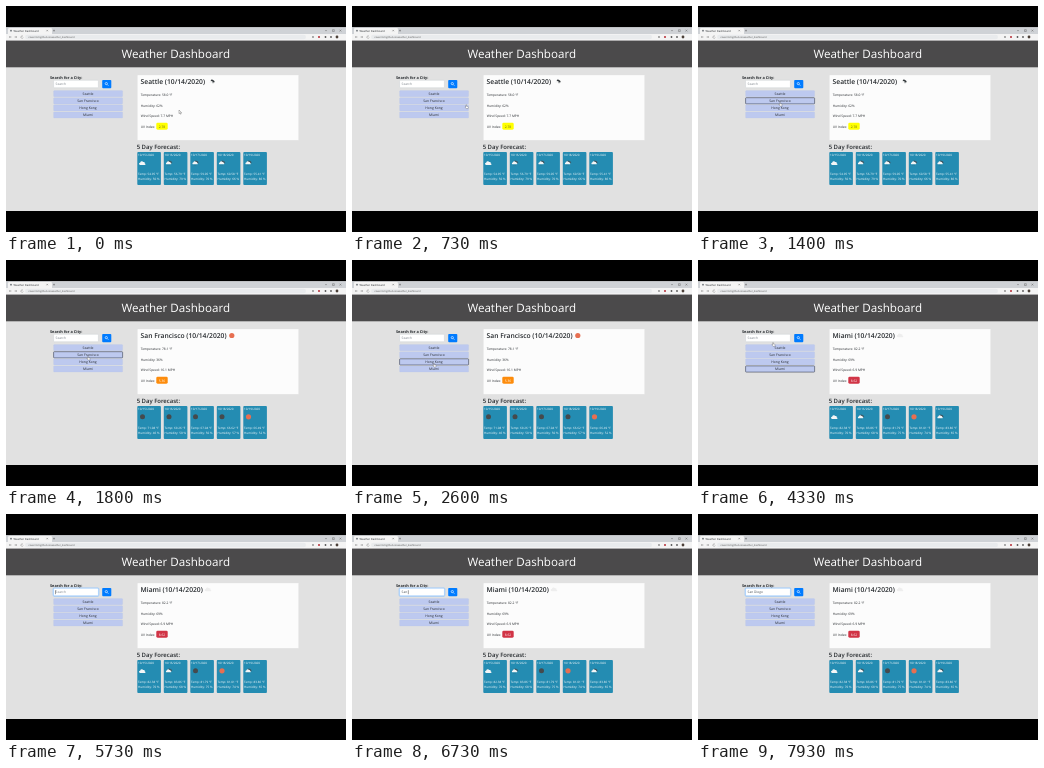
These frames come from a looping animation (340 by 226 pixels, 8000 ms). An HTML page:

```html
<!DOCTYPE html>
<html lang="en">
<head>
<meta charset="utf-8">
<title>Weather Dashboard</title>
<style>
  html, body { margin: 0; width: 100%; height: 100%; overflow: hidden; background: #000; }
  svg { display: block; width: 100%; height: 100%; }
  text { font-family: "Open Sans", "Noto Sans", sans-serif; text-rendering: geometricPrecision; fill: #24282c; white-space: pre; }
  .mid { text-anchor: middle; }
  .semi { font-weight: 600; }
  .bold { font-weight: 700; }
  .card text { fill: #fff; font-weight: 500; }
</style>
</head>
<body>
<svg viewBox="0 0 340 226">
  <defs>
    <path id="puff" d="M-2.9 2.2a1.5 1.5 0 0 1 0-3 2.3 2.3 0 0 1 4.2-.9 1.7 1.7 0 0 1 2 1.9 1 1 0 0 1 0 2z"/>
    <g id="cloud"><use href="#puff" fill="#f4f6f7" transform="translate(-.2 .5) scale(.75)"/></g>
    <g id="broken">
      <use href="#puff" fill="#3f5a66" transform="translate(.8 -.4) scale(.6)"/>
      <use href="#puff" fill="#f4f6f7" transform="translate(-.4 .6) scale(.65)"/>
    </g>
    <g id="rain">
      <use href="#broken" transform="translate(0 -.4) scale(.95)"/>
      <path d="M-.9 2l-.4 .9M.5 2l-.4 .9" stroke="#3f5a66" stroke-width=".4"/>
    </g>
    <circle id="night" r="2.5" fill="#454a4d"/>
    <circle id="sun" r="2.6" fill="#e76f51"/>
    <g id="overcast">
      <use href="#puff" fill="#33383b" transform="translate(.4 -.4) scale(.55)"/>
      <use href="#puff" fill="#f6f6f6" transform="translate(-.8 .5) scale(.45)"/>
      <path d="M.2 1.2h1.6" stroke="#33383b" stroke-width=".5"/>
    </g>
    <use id="faint" href="#puff" fill="#eeeeee" transform="scale(.75)"/>
  </defs>

  <rect width="340" height="226"/>
  <rect y="21.3" width="340" height="183.7" fill="#e1e1e1"/>

  <!-- browser bar -->
  <rect y="21.3" width="340" height="6.7" fill="#cfd2d6"/>
  <rect x="2" y="22" width="44" height="7" rx="1.2" fill="#f4f4f4"/>
  <circle cx="5" cy="24.7" r=".9" fill="#6d7379"/>
  <text x="7.5" y="25.7" font-size="2.7">Weather Dashboard</text>
  <g fill="none" stroke="#555" stroke-width=".4">
    <path d="M40.5 23.9l1.4 1.4m0-1.4l-1.4 1.4M47 24.6h2m-1-1v2M319 24.6h2M326.5 23.7h1.8v1.8h-1.8zM333.5 23.7l1.8 1.8m0-1.8l-1.8 1.8"/>
  </g>
  <rect y="28" width="340" height="6.6" fill="#f4f4f4"/>
  <path d="M5.5 31h-2.2l1-1m-1 1l1 1M8.5 31h2.2l-1-1m1 1l-1 1M17 30.3a1.2 1.2 0 1 0 .2 1.2" fill="none" stroke="#666" stroke-width=".4"/>
  <rect x="19" y="28.8" width="281" height="4.4" rx="2.2" fill="#e9ebed"/>
  <text x="22.5" y="32" font-size="2.5" style="fill:#555">ravenmill.github.io/weather_dashboard</text>
  <circle cx="307" cy="31" r=".9" fill="#888"/>
  <circle cx="313" cy="31" r="1" fill="#b52b35"/>
  <circle cx="319.5" cy="31" r=".9" fill="#555"/>
  <circle cx="325" cy="31" r=".9" fill="#555"/>
  <circle cx="331" cy="31" r="1.4" fill="#4c4038"/>

  <rect y="34.6" width="340" height="26.7" fill="#4b4a4b"/>
  <text class="mid" x="169.7" y="52" font-size="11.6" style="fill:#fff">Weather Dashboard</text>

  <!-- search column -->
  <text class="bold" x="44" y="72.9" font-size="3.85">Search for a City:</text>
  <rect id="glow" x="46.6" y="73.4" width="46.8" height="9.3" rx="1.6" fill="#a9cdf5"/>
  <rect id="field" x="47.6" y="74.3" width="44.8" height="7.5" rx=".9" fill="#fff" stroke-width=".4"/>
  <text id="query" x="49.6" y="79.3" font-size="3.3"></text>
  <path id="caret" d="M49.5 76.2v4" stroke="#111" stroke-width=".4"/>
  <rect x="96.2" y="73.9" width="9.1" height="8.3" rx=".9" fill="#007bff"/>
  <g fill="none" stroke="#fff" stroke-width=".6">
    <circle cx="100.3" cy="77.6" r="1.1"/><path d="M101.1 78.4l1.3 1.3"/>
  </g>
  <g id="cities"></g>

  <!-- current weather -->
  <rect x="131.3" y="69" width="161.4" height="65.2" fill="#fcfcfc" stroke="#dcdcdc" stroke-width=".3"/>
  <g id="today"></g>
  <text class="semi" x="130.7" y="143.2" font-size="5.95">5 Day Forecast:</text>
  <g id="forecast"></g>

  <g id="pointer" stroke="#444" stroke-width=".4" fill="#fff">
    <path id="arrow" d="M0 0v4.3l1-.9.8 1.6.7-.3-.7-1.6h1.3z" transform="scale(.85)"/>
    <path id="hand" d="M-.4 .3q.5-.6.9 0v1.8l2 .5q.5.2.4.8l-.5 1.8h-2.4l-1.5-2q0-.6.6-.4l.5.4z" transform="translate(0 -.8) scale(.75)"/>
  </g>
</svg>

<script>
const LOOP = 8000;
const $ = id => document.getElementById(id);
const show = (id, on) => $(id).setAttribute("visibility", on ? "visible" : "hidden");

const reports = [
  { from: 0, city: "Seattle", icon: "overcast", iconX: 206, temp: "58.0", humidity: 62, wind: "7.7",
    uv: "2.78", badge: "#ffff00", ink: "#5c5c20",
    days: ["cloud 54.95 50", "rain 56.79 79", "rain 59.05 70", "rain 60.58 66", "rain 55.41 86"] },
  { from: 1600, city: "San Francisco", icon: "sun", iconX: 225.8, temp: "78.1", humidity: 36, wind: "16.1",
    uv: "5.36", badge: "#fd8c0c", ink: "#fff",
    days: ["night 71.08 46", "night 69.26 50", "night 67.04 50", "night 66.62 57", "sun 66.49 52"] },
  { from: 2800, city: "Hong Kong", icon: "overcast", iconX: 220.7, temp: "75.2", humidity: 73, wind: "4.0",
    uv: "9.23", badge: "#d13446", ink: "#fff",
    days: ["broken 76.89 70", "broken 78.44 68", "broken 79.63 66", "broken 76.21 77", "broken 78.26 72"] },
  { from: 3800, city: "Miami", icon: "faint", iconX: 202, temp: "82.2", humidity: 69, wind: "6.9",
    uv: "8.62", badge: "#d13446", ink: "#fff",
    days: ["cloud 82.38 70", "rain 83.86 68", "night 81.79 75", "sun 81.01 74", "rain 83.86 65"] }
];

const focusTimes = [[0, -1], [1260, 1], [2400, 2], [3660, 3], [4660, -1]];
const inputFocus = 4660;
const blink = 533;
const keyTimes = [6260, 6530, 6600, 6730, 6930, 7130, 7200, 7260, 7400];
const typed = "San Diego";
const path = [
  [0, 173, 104], [330, 173, 104], [1000, 82, 97], [2060, 82, 97], [2400, 82, 104],
  [3330, 82, 104], [3600, 82, 107], [3950, 82, 107], [4330, 75, 83.2], [4530, 74.5, 79], [LOOP, 74.5, 79]
];

const latest = (list, t, time) => list.filter(item => time(item) <= t).pop();
const label = (x, y, size, str, attrs = "") => `<text x="${x}" y="${y}" font-size="${size}" ${attrs}>${str}</text>`;
const icon = (name, x, y) => `<use href="#${name}" transform="translate(${x} ${y})"/>`;

function todayMarkup(r) {
  return label(134.6, 77.5, 6.72, `${r.city} (10/14/2020)`, 'class="semi"') + icon(r.icon, r.iconX, 75.5) +
    label(134.7, 90, 3.25, `Temperature: ${r.temp} °F`) +
    label(134.7, 100.6, 3.25, `Humidity: ${r.humidity}%`) +
    label(134.7, 111, 3.25, `Wind Speed: ${r.wind} MPH`) +
    label(134.7, 121.6, 3.25, "UV Index:") +
    `<rect x="150.3" y="116.7" width="11.4" height="7" rx="1.4" fill="${r.badge}"/>` +
    label(156, 121.5, 3.25, r.uv, `class="mid" style="fill:${r.ink}"`);
}

function cardMarkup(day, i) {
  const [sky, temp, humidity] = day.split(" ");
  return `<g class="card" transform="translate(${131.3 + 26.5 * i} 146)">
    <rect width="23.6" height="33" rx=".9" fill="#248cb2"/>
    ${label(.8, 4.1, 3, `10/${15 + i}/2020`)}${icon(sky, 5.2, 10.8)}
    ${label(.8, 22.7, 3, `Temp: ${temp} °F`)}${label(.8, 28.1, 3.05, `Humidity: ${humidity} %`)}</g>`;
}

$("cities").innerHTML = reports.map(({ city }, i) => {
  const y = 84.6 + 7.1 * i;
  return `<rect class="city" x="47.6" y="${y}" width="69" height="6.2" rx=".7" fill="#bdc9ef"/>` +
    label(82, y + 4.3, 3.4, city, 'class="mid"');
}).join("");
const cityBoxes = document.querySelectorAll(".city");

function pointerAt(t) {
  const i = path.findIndex(p => p[0] > t);
  const [t0, x0, y0] = path[i - 1], [t1, x1, y1] = path[i];
  const k = (t - t0) / (t1 - t0), e = k * k * (3 - 2 * k);
  return [x0 + (x1 - x0) * e, y0 + (y1 - y0) * e];
}

let shown;
function render(t) {
  const report = latest(reports, t, r => r.from);
  if (report !== shown) {
    $("today").innerHTML = todayMarkup(report);
    $("forecast").innerHTML = report.days.map(cardMarkup).join("");
    shown = report;
  }

  const focused = latest(focusTimes, t, f => f[0])[1];
  cityBoxes.forEach((box, i) => {
    box.setAttribute("stroke", i === focused ? "#3a4054" : "#b4bfe2");
    box.setAttribute("stroke-width", i === focused ? .6 : .2);
  });

  const editing = t >= inputFocus;
  $("glow").setAttribute("opacity", Math.min(1, Math.max(0, (t - inputFocus) / 150)));
  $("field").setAttribute("stroke", editing ? "#80bdff" : "#c4cad0");
  const count = keyTimes.filter(k => k <= t).length;
  const query = $("query"), value = count ? typed.slice(0, count) : "Search";
  if (query.textContent !== value) query.textContent = value;
  query.style.fill = count ? "#495057" : "#7c838a";

  const since = t - (count ? keyTimes[count - 1] : inputFocus);
  show("caret", editing && Math.floor(since / (count ? 530 : blink)) % 2 === 0);
  const caretX = count ? query.getComputedTextLength() + .3 : 0;
  $("caret").setAttribute("transform", `translate(${caretX} 0)`);

  const [x, y] = pointerAt(t);
  const hand = !editing && x < 117 && y > 83;
  $("pointer").setAttribute("transform", `translate(${x} ${y})`);
  show("hand", hand);
  show("arrow", !editing && !hand);
}

function tick() {
  render(performance.now() % LOOP);
  requestAnimationFrame(tick);
}
tick();
</script>
</body>
</html>
```
